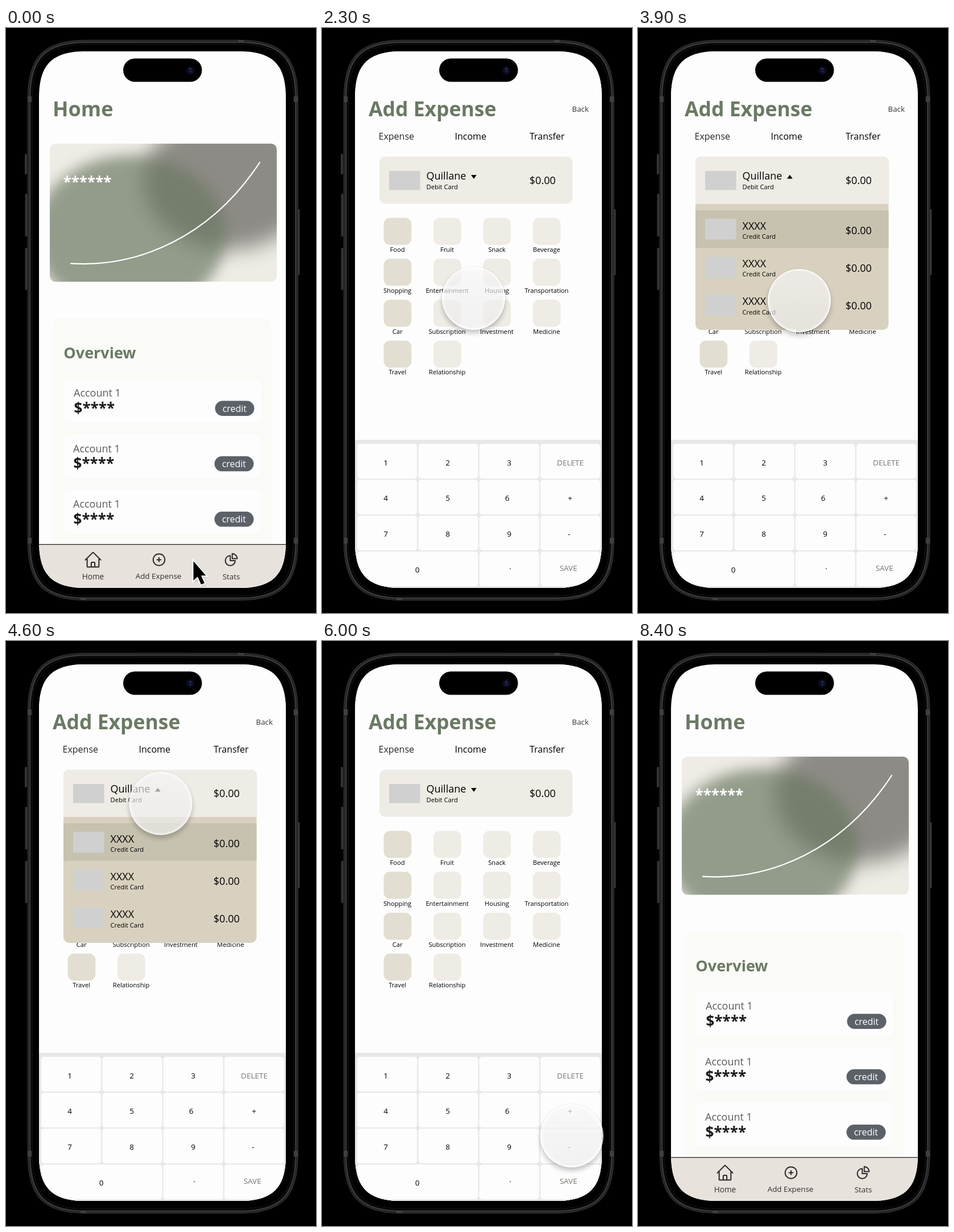
Write an HTML page that moves like this. It is 545 px wide and 1027 px high and loops after 8.5 s.

```html
<!DOCTYPE html>
<html lang="en">
<head>
<meta charset="utf-8">
<title>Expense tracker demo</title>
<style>
  html, body { margin: 0; width: 100%; height: 100%; overflow: hidden; background: #000; }
  svg { position: absolute; left: 0; top: 0; display: block; }
  text { font-family: "Open Sans", sans-serif; white-space: pre; }
  .b { font-weight: 700; }
  .mid { text-anchor: middle; }
  .icon { fill: none; stroke: #2b2b2b; stroke-linejoin: round; stroke-linecap: round; }

  #add, #menu, #arrow, #touch { animation: 8.5s step-end infinite; }
  #add { animation-name: add; }
  #menu { animation-name: menu; }
  #arrow { animation-name: arrow; }
  #touch {
    position: absolute; left: -55.5px; top: -55.5px; width: 111px; height: 111px;
    box-sizing: border-box; border-radius: 50%; border: 2px solid rgba(255,255,255,.94);
    background: linear-gradient(rgba(246,246,246,.67), rgba(236,236,236,.65)) padding-box;
    box-shadow: 0 0 1px rgba(0,0,0,.4), 0 6px 8px rgba(0,0,0,.22), inset 0 0 5px rgba(255,255,255,.5);
    animation-name: move, show;
    animation-timing-function: ease-in-out, step-end;
  }
  @keyframes add { 0% { visibility: hidden } 13.5% { visibility: visible } 78.2%, to { visibility: hidden } }
  @keyframes menu { 0% { visibility: hidden } 31.2% { visibility: visible } 57.6%, to { visibility: hidden } }
  @keyframes arrow { 0% { visibility: visible } 1.17%, to { visibility: hidden } }
  @keyframes show { 0% { visibility: hidden } 1.17% { visibility: visible } 94.1%, to { visibility: hidden } }
  @keyframes move {
    0%, 1.17% { transform: translate(312px, 940px) }
    8.24% { transform: translate(265px, 934px) }
    15.29%, 21.2% { transform: translate(263px, 933px) }
    30.6% { transform: translate(267px, 283px) }
    34.1% { transform: translate(267px, 283px); animation-timing-function: ease-in }
    36.47% { transform: translate(279.5px, 328.5px); animation-timing-function: ease-out }
    43.5%, 47% { transform: translate(283px, 478px) }
    54.12% { transform: translate(271.5px, 284.5px) }
    57.6% { transform: translate(269px, 268px) }
    70.59% { transform: translate(438.5px, 868px) }
    74.7%, 77.6% { transform: translate(461px, 938px) }
    80% { transform: translate(450px, 937.5px) }
    87%, to { transform: translate(461px, 925px) }
  }
</style>
</head>
<body>
<svg id="stage" width="545" height="1027" viewBox="0 0 545 1027"></svg>
<div id="touch"></div>
<script>
const GREEN = '#6a7963', SAND = '#efebe5', PAPER = '#fdfdfd';

const rect = (x, y, w, h, fill, r = 0, extra = '') =>
  `<rect x="${x}" y="${y}" width="${w}" height="${h}" rx="${r}" fill="${fill}" ${extra}/>`;
const text = (s, x, y, size, fill = '#000', cls = '') =>
  `<text x="${x}" y="${y}" font-size="${size}" fill="${fill}" class="${cls}">${s}</text>`;
const path = (d, extra) => `<path d="${d}" ${extra}/>`;
const each = (list, fn) => list.map(fn).join('');

// Rectangle with continuous corners; e is how far each corner reaches along a side.
function smooth(x, y, w, h, e, extra) {
  const k = e * 0.72, s = e - k;
  return path(`M${x + e} ${y}h${w - 2 * e}c${k} 0 ${e} ${s} ${e} ${e}v${h - 2 * e}c0 ${k} ${-s} ${e} ${-e} ${e}` +
    `h${2 * e - w}c${-k} 0 ${-e} ${-s} ${-e} ${-e}v${2 * e - h}c0 ${-k} ${s} ${-e} ${e} ${-e}z`, extra);
}

// 24-unit outline icon centred on (x, y).
const icon = (d, x, y, scale, width = 1.5) =>
  path(d, `class="icon" stroke-width="${width}" transform="translate(${x} ${y}) scale(${scale}) translate(-12 -12)"`);

function phone() {
  const buttons = [[33, 221, 36], [33.5, 291, 75], [33.5, 386, 74], [512.5, 318, 116]];
  const bands = [[38, 120, 7, 10], [506, 120, 7, 10], [38, 895, 7, 10], [506, 895, 7, 10],
    [408, 21, 10, 4], [131, 1000, 10, 4]];
  return each(buttons, ([x, y, h]) => rect(x, y, 4, h, '#343435', 1.5)) +
    smooth(38.5, 21.5, 474.5, 983, 102, 'fill="#1a1a1b" stroke="#323233" stroke-width="1.5"') +
    smooth(42, 25, 467.5, 976, 98, 'fill="#000" stroke="#363637" stroke-width="3"') +
    smooth(46, 29, 459.5, 968, 94, 'fill="#000" stroke="#0e0e0f" stroke-width="2"') +
    each(bands, b => rect(...b, '#3f3f40')) +
    rect(228, 26, 95, 3, '#0b0b0b', 1.5);
}

function island() {
  return rect(206, 53.5, 138.5, 41, '#000', 20.5) +
    '<circle cx="324" cy="74.5" r="7.5" fill="#0a0a18"/>' +
    '<circle cx="324" cy="74.5" r="4" fill="#12133a"/>' +
    '<circle cx="324" cy="71.5" r="1.6" fill="#2c3560"/><circle cx="324.5" cy="77" r="1.3" fill="#25285a"/>';
}

function account(i) {
  const y = 97.3 * i, x = i ? -1 : 0;
  return rect(101, 616 + y, 348 + x, 76.5, PAPER, 10) +
    text('Account 1', 119 + x, 647.3 + y, 18, '#5a5a5a') +
    text('$****', 119.6 + x, 677 + y, 26, '#1b1b1d', 'b') +
    rect(367.5 + x, 654.5 + y, 69, 26.5, '#5c6169', 13.25) +
    text('credit', 401.8 + x, 673.8 + y, 16, '#fff', 'mid');
}

function nav() {
  const label = '#2f2f2f';
  return rect(58, 907, 434, 77, '#e7e2dc') + rect(58, 906, 434, 1.2, '#1c1c1c') +
    icon('m2.25 12 9-9q.75-.65 1.5 0l9 9M4.5 9.75v10.1q0 1.15 1.15 1.15h4.1v-4.9q0-1.1 1.1-1.1h2.3q1.1 0 1.1 1.1V21h4.1' +
      'q1.15 0 1.15-1.15V9.75M8.25 21h8.25', 153, 933.8, 1.38) +
    icon('M12 9v6m3-3H9m12 0a9 9 0 1 1-18 0 9 9 0 0 1 18 0Z', 269, 933.4, 1.14, 1.75) +
    icon('M10.5 6a7.5 7.5 0 1 0 7.5 7.5h-7.5V6ZM13.5 10.5H21A7.5 7.5 0 0 0 13.5 3v7.5Z', 396, 933.3, 1.16, 1.75) +
    text('Home', 153, 968, 13.6, label, 'mid') +
    text('Add Expense', 268, 967, 13.4, label, 'mid') +
    text('Stats', 396, 968, 13.4, label, 'mid');
}

function home() {
  return text('Home', 82, 155, 36, GREEN, 'b') +
    `<g clip-path="url(#card)">${rect(77, 203, 399, 242.5, '#efece6')}
      <ellipse cx="391" cy="268" rx="150" ry="121" fill="#8d8b85" filter="url(#wide)"/>
      <ellipse cx="218" cy="363" rx="168" ry="139" fill="#6a7862" opacity=".69" filter="url(#soft)"/></g>` +
    path('M114 413.3C233 421 361 366 446 236', 'fill="none" stroke="#fff" stroke-width="2.2" stroke-linecap="round"') +
    text('******', 100.5, 280, 26, '#fff', 'b') +
    rect(82.5, 510, 384, 420, '#fafaf6', 12) +
    text('Overview', 101.3, 580, 27, GREEN, 'b') +
    each([0, 1, 2], account) + nav();
}

function cardRow(name, kind, y) {
  return text(name, 183.5, y, 18) + text(kind, 183.5, y + 16.3, 11.2) + text('$0.00', 364.8, y + 8, 18);
}

function categories() {
  const names = ['Food', 'Fruit', 'Snack', 'Beverage', 'Shopping', 'Entertainment', 'Housing',
    'Transportation', 'Car', 'Subscription', 'Investment', 'Medicine', 'Travel', 'Relationship'];
  return each(names, (name, i) => {
    const x = 87.4 * (i % 4), y = 71.8 * (i >> 2);
    return rect(108.5 + x, 333.3 + y, 48.8, 47.5, i % 4 ? SAND : '#e2dfd2', 11) +
      text(name, 132.6 + x, 393 + y, 11.2, '#000', 'mid');
  });
}

function keypad() {
  const cols = [62, 169.5, 276.7, 384];
  const labels = [
    ['1', 112, 767.5], ['2', 221, 767.5], ['3', 329, 767.5],
    ['4', 112, 829.5], ['5', 221, 829.5], ['6', 325.5, 829.5], ['+', 436, 829.5],
    ['7', 112, 892.5], ['8', 221, 892.5], ['9', 329, 892.5], ['-', 434.5, 892.5],
    ['0', 167.5, 955.5], ['.', 331, 950]];
  let out = rect(58, 723, 434, 261, '#e8e8e8');
  for (let r = 0; r < 4; r++) cols.forEach((x, c) => {
    if (r === 3 && c === 1) return;
    out += rect(x, 730 + 63 * r, r === 3 && c === 0 ? 212.5 : 105, 61, PAPER, 5);
  });
  return out + each(labels, ([s, x, y]) => text(s, x, y, 13.5, '#000', 'mid')) +
    text('DELETE', 436.5, 767.5, 13.5, '#77756f', 'mid') +
    text('SAVE', 433.2, 953.3, 13.5, '#77756f', 'mid');
}

function bank(arrow) {
  return rect(118, 251, 54.5, 33.5, '#d0d0d0') + cardRow('Quillane', 'Debit Card', 266.3) +
    path(arrow, 'fill="#000"');
}

function menu() {
  return rect(101, 226, 339.5, 304, '#d9d1bf', 10) +
    path('M101 309V236Q101 226 111 226H430.5Q440.5 226 440.5 236V309Z', `fill="${SAND}"`) +
    rect(101, 320, 339.5, 66, '#c7c2af') +
    bank('M262 264.5H271.8L266.9 257.8Z') +
    each([0, 1, 2], i => rect(118, 335 + 66.4 * i, 54.5, 36.5, '#d0d0d0') +
      cardRow('XXXX', 'Credit Card', 353.6 + 66.4 * i));
}

function addExpense() {
  return rect(58, 41, 434, 942, PAPER) +
    text('Add Expense', 82, 155, 35.5, GREEN, 'b') +
    text('Back', 439.5, 146.5, 13.4, '#333') +
    text('Expense', 99.5, 196, 16, '#262626') + text('Income', 233.5, 196, 16) + text('Transfer', 365, 196, 16) +
    rect(101, 226, 339.5, 82.5, SAND, 10) +
    bank('M262 258H271.8L266.9 264.8Z') +
    categories() + keypad() + `<g id="menu">${menu()}</g>`;
}

function pointer() {
  const d = 'M329.5 936V970L337 963.3 343 977 349 974.4 343 961.3H351.5Z';
  return path(d, 'opacity=".35" filter="url(#shade)" transform="translate(1 2)"') +
    path(d, 'stroke="#fff" stroke-width="4" paint-order="stroke"');
}

const blur = (id, sd) =>
  `<filter id="${id}" x="-30%" y="-30%" width="160%" height="160%"><feGaussianBlur stdDeviation="${sd}"/></filter>`;

document.getElementById('stage').innerHTML =
  `<defs>
    <clipPath id="screen">${smooth(58, 41, 434, 942, 82, '')}</clipPath>
    <clipPath id="card">${rect(77, 203, 399, 242.5, '#fff', 10)}</clipPath>
    ${blur('wide', 18)}${blur('soft', 12)}${blur('shade', 2)}
  </defs>` + phone() +
  `<g clip-path="url(#screen)">${rect(58, 41, 434, 942, PAPER)}${home()}<g id="add">${addExpense()}</g></g>` +
  island() + `<g id="arrow">${pointer()}</g>`;
</script>
</body>
</html>
```
